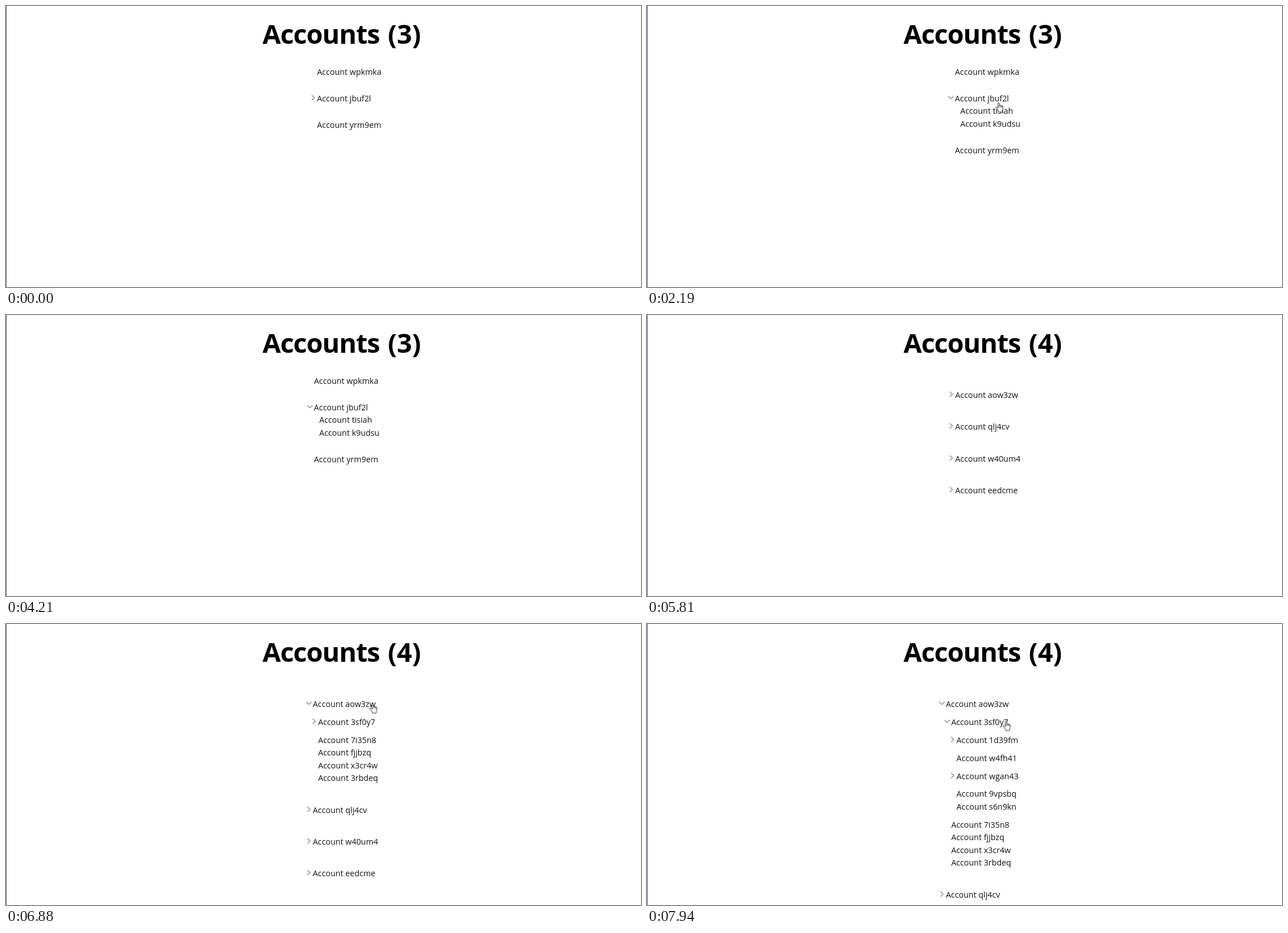
An HTML page with a canvas for the animation above (8 s loop, 1125 px wide and 498 px high).

```html
<!DOCTYPE html>
<html lang="en">
<head>
<meta charset="utf-8">
<title>Accounts</title>
<style>
  html, body { margin: 0; width: 100%; height: 100%; overflow: hidden; background: #fff; }
  canvas { display: block; width: 1125px; height: 498px; }
</style>
</head>
<body>
<canvas id="stage" width="1125" height="498"></canvas>
<script>
const ctx = document.getElementById('stage').getContext('2d');
const LOOP = 8000, TICK = 65;
const LINE = 22.5, MARGIN = 9.375, ROW_WIDTH = 114;

// A string is a leaf, an array is [id, ...children]
const small = { top: 122, gap: LINE + 2.6 * MARGIN, nodes: [
  'wpkmka', ['jbuf2l', 'tisiah', 'k9udsu'], 'yrm9em'
] };
const large = { top: 147, gap: LINE + 3.6 * MARGIN, nodes: [
  ['aow3zw',
    ['3sf0y7', ['1d39fm'], 'w4fh41', ['wgan43'], '9vpsbq', 's6n9kn'],
    '7i35n8', 'fjjbzq', 'x3cr4w', '3rbdeq'],
  ['qlj4cv'], ['w40um4'], ['eedcme']
] };

const views = [
  { at: 0, tree: small, x: 551, open: [] },
  { at: 1800, tree: small, x: 545.5, open: ['jbuf2l'] },
  { at: 5810, tree: large, x: 546, open: [] },
  { at: 6810, tree: large, x: 543.5, open: ['aow3zw'] },
  { at: 7670, tree: large, x: 529.5, open: ['aow3zw', '3sf0y7'] }
];

// Each visit enters at a point, then glides and rests
const visits = [
  { at: 340, enter: [1040, 467], moves: [
    { at: 340, time: 130, to: [829, 218] },
    { at: 730, time: 70, to: [679, 85] },
    { at: 1060, time: 0, to: [674, 87] },
    { at: 1125, time: 265, to: [621, 149] },
    { at: 1660, time: 0, to: [613, 145] },
    { at: 1800, time: 0, to: [620, 155] },
    { at: 2190, time: 0, to: [622.5, 171] },
    { at: 2250, time: 390, to: [642, 246] },
    { at: 2990, time: 780, to: [572, 85] },
    { at: 3840, time: 190, to: [541, -13] },
    { at: 4210, time: 0, to: [541, -40] }
  ] },
  { at: 6080, enter: [630, 54], moves: [
    { at: 6080, time: 130, to: [659, 90] },
    { at: 6400, time: 210, to: [649, 141] },
    { at: 7150, time: 450, to: [635.5, 172] }
  ] }
];

const arrow = new Path2D('M.5 .8V16.2L4.2 12.7L6.9 18.7L9.4 17.6L6.8 11.7H11.6Z');
const hand = new Path2D('M5.5 13V2Q5.5 .5 7 .5T8.5 2V7Q8.7 5.6 10 5.6T11.4 7V8' +
  'Q11.6 6.5 12.9 6.5T14.2 8V9Q14.5 7.6 15.6 7.8T16.5 9.4V14.5' +
  'Q16.5 17 15 18.5V21.5H6.5V19L2 13.5Q.3 11.6 1 10.6Q2.2 9.5 3.8 10.9Z' +
  'M8.5 7V11M11.4 8V11M14.2 9V11.5');

const latest = (list, t) => list.filter(item => item.at <= t).pop();

function flatten(nodes, open, depth = 0) {
  return nodes.flatMap(node => {
    const [id, ...children] = [node].flat();
    const row = { id, depth, branch: Array.isArray(node), open: open.includes(id) };
    return row.open ? [row, ...flatten(children, open, depth + 1)] : [row];
  });
}

function layout({ tree, x, open }) {
  let y = tree.top;
  return flatten(tree.nodes, open).map((row, i, rows) => {
    const above = rows[i - 1];
    if (above) {
      const spaced = row.branch || row.depth < above.depth || (above.depth && above.branch);
      y += row.depth ? LINE + (spaced ? MARGIN : 0) : tree.gap;
    }
    return { ...row, x: x + row.depth * MARGIN, y: Math.round(y) };
  });
}

function drawTitle(count) {
  ctx.fillStyle = '#000';
  ctx.font = 'bold 47px "Open Sans", "Noto Sans", sans-serif';
  ctx.letterSpacing = '-1px';
  ctx.fillText('Accounts', 454.5, 67);
  ctx.letterSpacing = '0px';
  ctx.fillText(`(${count})`, 676.5, 67);
}

function drawChevron(x, y, open) {
  ctx.save();
  ctx.translate(x, y);
  if (open) ctx.rotate(Math.PI / 2);
  ctx.beginPath();
  ctx.moveTo(-2.4, -4.6);
  ctx.lineTo(2.2, 0);
  ctx.lineTo(-2.4, 4.6);
  ctx.strokeStyle = '#222';
  ctx.lineWidth = 1;
  ctx.stroke();
  ctx.restore();
}

function drawRow({ id, x, y, branch, open }) {
  ctx.font = '14.35px "Open Sans", "Noto Sans", sans-serif';
  ctx.fillStyle = '#111';
  ctx.fillText('Account ' + id, x, y);
  if (branch) drawChevron(x - 7, y - 6.5, open);
}

function pointerAt(t) {
  const visit = latest(visits, t);
  if (!visit) return null;
  let point = visit.enter;
  for (const { at, time, to } of visit.moves) {
    if (t < at) break;
    const elapsed = Math.floor((t - at) / TICK) * TICK;
    const p = time ? Math.min(1, elapsed / time) : 1;
    point = point.map((v, i) => v + (to[i] - v) * p);
  }
  return point;
}

function drawPointer([x, y], rows) {
  const hovering = rows.some(row =>
    Math.abs(y - row.y + 5) <= LINE / 2 && x >= row.x && x <= row.x + ROW_WIDTH);
  const path = hovering ? hand : arrow;
  ctx.save();
  ctx.translate(hovering ? x - 5 : x, y);
  ctx.scale(0.79, 0.79);
  ctx.fillStyle = '#fff';
  ctx.strokeStyle = '#111';
  ctx.lineWidth = 1.1;
  ctx.fill(path);
  ctx.stroke(path);
  ctx.restore();
}

function draw(t) {
  ctx.fillStyle = '#fff';
  ctx.fillRect(0, 0, 1125, 498);
  ctx.fillStyle = '#5a5468';
  ctx.fillRect(0, 0, 1, 498);
  const view = latest(views, t);
  const rows = layout(view);
  drawTitle(view.tree.nodes.length);
  rows.forEach(drawRow);
  const pointer = pointerAt(t);
  if (pointer) drawPointer(pointer, rows);
}

let begin = null;
function tick(now) {
  begin ??= now;
  draw((now - begin) % LOOP);
  requestAnimationFrame(tick);
}
draw(0);
requestAnimationFrame(tick);
</script>
</body>
</html>
```
